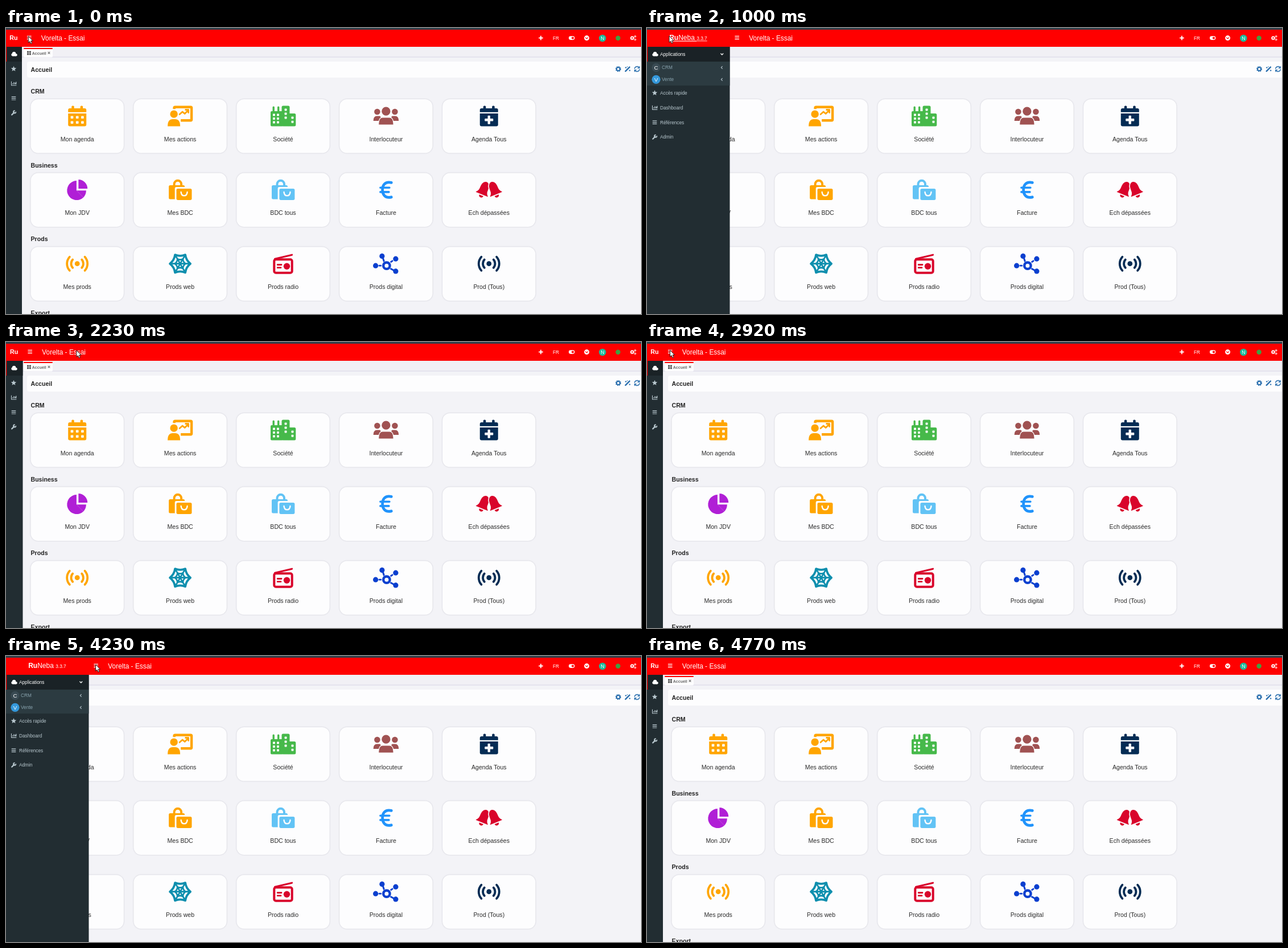
Recreate the animation shown at these times as an HTML page. Size 1116 by 502 pixels, loop 4.85 s.

```html
<!DOCTYPE html>
<html lang="fr">
<head>
<meta charset="utf-8">
<title>Accueil</title>
<style>
html, body { margin: 0; width: 100%; height: 100%; overflow: hidden; background: #f3f3f7; }
svg { display: block; width: 1116px; height: 502px; font-family: "Liberation Sans", Arial, sans-serif; }
.i { fill: currentColor; }
.l { fill: none; stroke: currentColor; stroke-linecap: round; stroke-linejoin: round; }
.h { fill: #fdfdfe; }
.card { fill: #fdfdfe; filter: drop-shadow(0 .8px 1.2px rgba(40, 40, 70, .22)); }
.b { font-weight: bold; }
.m { text-anchor: middle; }
</style>
</head>
<body>
<svg id="stage" viewBox="0 0 1116 502"></svg>
<script>
const LOOP = 4850, FRAME = 1000 / 13, SLIDE = 300;
const MINI = 28, WIDE = 145.5;

// Markup helpers
const text = (x, y, s, size, fill, cls = '') =>
  `<text x="${x}" y="${y}" font-size="${size}" fill="${fill}" class="${cls}">${s}</text>`;
const rect = (x, y, w, h, r = 0, extra = 'class="i"') =>
  `<rect x="${x}" y="${y}" width="${w}" height="${h}" rx="${r}" ${extra}/>`;
const dot = (x, y, r, extra = 'class="i"') => `<circle cx="${x}" cy="${y}" r="${r}" ${extra}/>`;
const line = (d, w, extra = '') => `<path class="l" d="${d}" stroke-width="${w}" ${extra}/>`;
const area = (d, extra = 'class="i"') => `<path d="${d}" ${extra}/>`;
const at = (x, y, color, body, more = '') =>
  `<g transform="translate(${x} ${y}) ${more}" color="${color}">${body}</g>`;
const hole = 'class="h"';
const polar = (r, deg) => {
  const a = deg * Math.PI / 180;
  return (r * Math.cos(a)).toFixed(2) + ' ' + (r * Math.sin(a)).toFixed(2);
};

// Small interface icons
const cloud = dot(-2.8, 1, 2.4) + dot(-.4, -1, 3.2) + dot(3, 1.2, 2.2) + rect(-3, .5, 6.2, 2.9, 1);
const star = area('M' + [...Array(10)].map((_, k) => polar(k % 2 ? 2.2 : 5, k * 36 - 90)).join('L') + 'Z');
const chart = line('M-4-3.5V3.3H4.5', 1.1) + line('M-1.7 1.3V-.5M.5 1.3V-2.5M2.7 1.3V-1.5M4.2 1.3V-3', 1.3, 'style="stroke-linecap:butt"');
const bars = w => line(`M${-w}-2.7H${w}M${-w} 0H${w}M${-w} 2.7H${w}`, 1.2, 'style="stroke-linecap:butt"');
const wrench = line('M-3.3 3.3L1 -1', 2.2) + line('M1.6-3.9A2.2 2.2 0 1 0 3.9-1.6', 1.7);
const gear = (r, w) => dot(0, 0, r, `class="l" stroke-width="${w}"`) +
  dot(0, 0, r * 1.38, `class="l" style="stroke-linecap:butt" stroke-width="${w * .9}" stroke-dasharray="${r * 1.38 * Math.PI / 8}"`);
const chevDown = line('M-2-1L0 1L2-1', 1.3);
const chevLeft = line('M1-2L-1 0L1 2', 1.1);

// Card icons, centred on 0,0
const calendar = inner => rect(-10, -18, 4.6, 8, 2) + rect(5.4, -18, 4.6, 8, 2) +
  area('M-16-6.8V-10.5Q-16-13.5-13-13.5H13Q16-13.5 16-10.5V-6.8Z') +
  area('M-16-4.5H16V15Q16 18 13 18H-13Q-16 18-16 15Z') + inner;
const days = calendar([0, 9].map(y => [-11.5, -2.3, 6.9].map(x => rect(x, y, 4.6, 4.6, .8, hole)).join('')).join(''));
const dayPlus = calendar(rect(-7.5, 4.6, 15, 4.4, 1, hole) + rect(-2.2, -.7, 4.4, 15, 1, hole));
const board = rect(-10.5, -15.7, 30.5, 23.5, 1.5, 'class="l" stroke-width="4.4"') +
  dot(-11, -3.4, 9, hole) + rect(-24, 2.5, 25, 17, 0, hole) + dot(-11, -3.4, 6.7) +
  area('M-22 18Q-22 5.6-13 5.6H-9Q0 5.6 0 18Z') +
  line('M-1-3L4-7.5L8-4L14.5-10.5M9.5-11H14.5V-6', 2.8);
const city = rect(-22, -8.5, 22, 26.5, 2) + rect(-18.5, -17, 3.4, 10, 1.6) + rect(-10, -17, 3.4, 10, 1.6) +
  rect(-2.5, -18, 14, 36, 2.5) + rect(8, -4.5, 14.3, 22.5, 2.5) +
  [[-18, -4], [-11, -4], [-18, 2.4], [-11, 2.4], [-18, 9], [-11, 9], [2.6, -13], [2.6, -6], [2.6, 1], [14.5, 1], [14.5, 8.3]]
    .map(([x, y]) => rect(x, y, 3.9, 4, .8, hole)).join('');
const side = s => dot(15.5 * s, -7.5, 5.3) + area(`M${22.3 * s} 8.5Q${22.3 * s} 0 ${16 * s} 0H${11 * s}Q${7 * s} 2 ${11.5 * s} 8.5Z`);
const users = side(-1) + side(1) + dot(0, -8.3, 9, hole) + dot(0, -8.3, 7.6) +
  area('M-13.2 15.5Q-13.2 2.4-6 2.4H6Q13.2 2.4 13.2 15.5Z', 'class="i" stroke="#fdfdfe" stroke-width="1.2"');
const pie = area('M-1.3-16V1.2L10.8 13.3A17 17 0 1 1-1.3-16Z') +
  area('M-1.3 1.2H15.6A17 17 0 0 1 10.8 13.3Z') + area('M2.2-18A16 16 0 0 1 18-2.2H2.2Z');
const bags = line('M-10.5-7V-10A6.2 6.2 0 0 1 2-10V-7', 4) + rect(-20, -8, 28, 24.5, 2.5) +
  rect(-9.4, -5, 32, 24, 3, hole) + rect(-6.6, -2.2, 27, 20, 2.6) +
  area('M1.5 3.8Q2 10.3 7 10.3Q12 10.3 12.5 3.8', 'fill="none" stroke="#fdfdfe" stroke-width="2.4" stroke-linecap="round"');
const euro = line('M9.3-12.7C-1-15-6.3-9-6.3 0C-6.3 9-1 15 9.3 12.7', 4.8) + line('M-10-3.8H6M-10 3.8H5', 3.6);
const bell = area('M-12 10C-7 6-8.5 2-8-3C-7.5-9-4-13 0-13S7.5-9 8-3C8.5 2 7 6 12 10Q12.5 12 10 12H-10Q-12.5 12-12 10Z',
  'class="i" stroke="#fdfdfe" stroke-width="1.6"') + area('M-4 13.2H4Q3.4 17 0 17T-4 13.2Z');
const bells = at(-8.5, -2.5, 'currentColor', bell, 'rotate(22)') + at(8.5, -2.5, 'currentColor', bell, 'rotate(-22)');
const arcs = r => [0, 180].map(a => line(`M${polar(r, a - 42)}A${r} ${r} 0 0 1 ${polar(r, a + 42)}`, 3.8)).join('');
const tower = dot(0, 0, 4.4) + arcs(10.7) + arcs(18);
const ring = (r, dip) => 'M' + polar(r, 0) + [1, 2, 3, 4, 5, 6].map(k => `Q${polar(r * dip, k * 60 - 30)} ${polar(r, k * 60)}`).join('') + 'Z';
const web = line(ring(18, .66), 3.8) + line(ring(9.5, .62), 2.8) +
  line([0, 60, 120].map(a => `M${polar(18, a)}L${polar(18, a + 180)}`).join(''), 2.7);
const radio = line('M-14.5-8.5L15.5-15.5', 3.2) + rect(-15.7, -7.5, 31.4, 23.5, 3, 'class="l" stroke-width="4"') +
  dot(6.5, 4.5, 5.7) + line('M-9.8 1.8H-3M-9.8 7H-4', 2.8);
const nodes = line('M-6.5-13L-2.5-1M5 7L16 13', 3) + line('M-17 3.5H-6M4.5-.5L16-8', 2.8, 'stroke-dasharray="3 5" stroke-dashoffset="-5"') +
  [[-7, -13.3], [17, -8.5], [17, 13.2], [-18.3, 3.5]].map(([x, y]) => dot(x, y, 4.6)).join('') +
  dot(1, 3.5, 8.4, hole) + dot(1, 3.5, 5.7, 'class="l" stroke-width="4.4"');

const ORANGE = '#ffa500', RED = '#d9042b', NAVY = '#052c54';
const sections = [
  ['CRM', ['Mon agenda', days, ORANGE], ['Mes actions', board, ORANGE], ['Société', city, '#46b94a'],
    ['Interlocuteur', users, '#a05252'], ['Agenda Tous', dayPlus, NAVY]],
  ['Business', ['Mon JDV', pie, '#b01fd6'], ['Mes BDC', bags, ORANGE], ['BDC tous', bags, '#62c3f5'],
    ['Facture', euro, '#2093fb'], ['Ech dépassées', bells, RED]],
  ['Prods', ['Mes prods', tower, ORANGE], ['Prods web', web, '#0e8fae'], ['Prods radio', radio, RED],
    ['Prods digital', nodes, '#0a3fcf'], ['Prod (Tous)', tower, NAVY]],
  ['Export']
];
const INK = '#222', SOFT = '#b8c7ce', DIM = '#8aa4af', BLUE = '#2a6fae';

const grid = sections.map(([name, ...cards], row) => {
  const y = 125 + row * 129.6;
  return text(43.5, y - 9.8, name, 10.6, INK, 'b') + cards.map(([label, icon, color], col) => {
    const x = 43.5 + col * 180.9, mid = x + 81.7;
    return rect(x, y, 163.4, 94.5, 13, 'class="card"') + at(mid, y + 29.5, color, icon) +
      text(mid, y + 73.8, label, 10.6, '#2b2b2b', 'm');
  }).join('');
}).join('');

const page = rect(0, 0, 1116, 502, 0, 'fill="#f3f3f7"') +
  rect(0, 33, 1116, 18, 0, 'fill="#f1f0f5"') + rect(0, 50.5, 1116, 1, 0, 'fill="#d8d5e6"') +
  rect(31, 35, 51, 16.5, 2, 'fill="#fdfdfe"') + rect(31, 35, 51, 2, 1, 'fill="#f00"') +
  [0, 3.8].map(dy => [0, 3.8].map(dx => rect(37 + dx, 40.5 + dy, 3.1, 3, 0, 'fill="#555"')).join('')).join('') +
  text(45.8, 46.5, 'Accueil', 7, '#666', 'b') + at(75.5, 43.7, '#666', line('M-1.5-1.5L1.5 1.5M1.5-1.5L-1.5 1.5', 1.1)) +
  rect(37, 59, 1090, 28, 4, 'fill="#fdfdfe"') + text(43.5, 76.6, 'Accueil', 10.6, INK, 'b') +
  at(1076, 72, BLUE, gear(3, 2)) +
  at(1092.5, 72, BLUE, line('M-3.8 3.8L3.4-3.4', 2.4) + line('M-3.2-3.5V-1.5M-4.2-2.5H-2.2M3.6 1.6V3.6M2.6 2.6H4.6M-.5-4.6V-3.6', 1)) +
  at(1109, 72, BLUE, line('M-4.2-.8A4.3 4.3 0 0 1 3.6-2.5M4.2 .8A4.3 4.3 0 0 1-3.6 2.5', 1.5) + line('M4.3-4.6V-1.6H1.3M-4.3 4.6V1.6H-1.3', 1.2)) +
  grid;

const item = (y, icon, label) => at(13.5, y, SOFT, icon) + text(23, y + 2.9, label, 8.25, SOFT);
const sub = (y, letter, label, color) => dot(16, y, 7.6, `fill="${color}"`) +
  text(16, y + 3.5, letter, 9.8, '#fff', 'm') + text(26, y + 2.9, label, 8.25, DIM);
const menu = [[star, 'Accès rapide'], [chart, 'Dashboard'], [bars(3.8), 'Références'], [wrench, 'Admin']];

const sidebar = rect(0, 33, 146, 469, 0, 'fill="#222d32"') + rect(0, 33, 146, 26, 0, 'fill="#1a2226"') +
  rect(0, 33, 1.2, 26, 0, 'fill="#f00"') + at(14.5, 46, '#fff', cloud) +
  `<g id="mini">${menu.map(([icon], k) => at(13.5, 71.7 + k * 25.8, SOFT, icon)).join('')}</g>` +
  `<g id="full">${rect(0, 59, 146, 42, 0, 'fill="#2c3b41"')}${text(23, 48.9, 'Applications', 8.25, '#fff')}` +
  sub(69.3, 'C', 'CRM', '#394a53') + sub(90.3, 'V', 'Vente', '#3498db') +
  menu.map(([icon, label], k) => item(114 + k * 25.8, icon, label)).join('') +
  `<g id="chevs">${at(-13.7, 46, '#fff', chevDown)}${at(-14.2, 69.3, SOFT, chevLeft)}${at(-14.2, 90.3, SOFT, chevLeft)}</g></g>`;

const header = rect(0, 0, 1116, 3.5, 0, 'fill="#333e48"') + rect(0, 3, 1116, 30, 0, 'fill="#f00"') +
  text(0, 21.2, 'Ru', 10.6, '#fff', 'b m" id="short') +
  `<text id="logo" y="21.4" font-size="12" fill="#fff" class="m"><tspan class="b">Ru</tspan>Neba <tspan font-size="8.3">3.3.7</tspan></text>` +
  `<g id="nav">${at(12.7, 17, '#fff', bars(3.8))}${text(33.8, 21.5, 'Vorelta - Essai', 11.9, '#fff')}</g>` +
  at(940, 17.5, '#fff', line('M-3 0H3M0-3V3', 1.9)) + text(966.5, 20.6, 'FR', 8.2, '#fff', 'm') +
  rect(989, 14.3, 10.4, 6.6, 3.3, 'fill="#fff"') + dot(996, 17.6, 2.1, 'fill="#f00"') +
  dot(1020.6, 17.6, 4.5, 'fill="#fff"') + at(1020.6, 17.9, '#f00', chevDown) +
  dot(1048.3, 18, 6.2, 'fill="#1abc9c"') + text(1048.3, 21.2, 'N', 8.6, '#fff', 'm') +
  dot(1075.6, 17.8, 4.2, 'fill="#3fa142"') +
  at(1100.5, 17.6, '#fff', gear(2.1, 1.7)) + at(1105.6, 14.8, '#fff', gear(1.1, 1)) + at(1105.6, 20.4, '#fff', gear(1.1, 1));

const $ = id => document.getElementById(id);
$('stage').innerHTML = `<clipPath id="clip"><rect id="cut" y="33" height="469"/></clipPath>` + page +
  `<g clip-path="url(#clip)">${sidebar}</g>` + header +
  `<path id="cursor" d="M0 0V11.3L2.6 9L4.4 13.1L6.4 12.2L4.6 8.2H8Z" fill="#fff" stroke="#111" stroke-width=".9"/>`;

// Motion: [time, open] toggles and [time, x, y] pointer stops
const toggles = [[630, 1], [1955, 0], [3120, 1], [4390, 0]];
const pointer = [[0, 39.3, 14.5], [1130, 39, 14], [1600, 157.5, 15], [2025, 157.5, 15], [2580, 40.5, 14.5],
  [3120, 40.5, 14.5], [3380, 38.6, 13.2], [3600, 38.6, 13.2], [4080, 157.5, 15], [4560, 157.5, 15], [4740, 168, -18]];

// cubic-bezier(.42, 0, .58, 1)
function ease(u) {
  let lo = 0, hi = 1, s = .5;
  for (let k = 0; k < 16; k++) {
    s = (lo + hi) / 2;
    const x = 1.26 * s * (1 - s) ** 2 + 1.74 * s * s * (1 - s) + s ** 3;
    if (x < u) lo = s; else hi = s;
  }
  return s * s * (3 - 2 * s);
}
const progress = (t, from, span) => {
  const u = (t - from) / span;
  return u <= 0 ? 0 : u >= 1 ? 1 : ease(u);
};

function draw(t) {
  let open = 0, part = 0;
  for (const [start, state] of toggles) {
    if (t < start) break;
    const p = progress(t, start, SLIDE);
    open = state;
    part = state ? p : 1 - p;
  }
  const w = MINI + (WIDE - MINI) * part;

  let [, x, y] = pointer[0];
  for (let k = 1; k < pointer.length; k++) {
    const [t0, x0, y0] = pointer[k - 1], [t1, x1, y1] = pointer[k];
    if (t < t0) break;
    const p = progress(t, t0, t1 - t0);
    x = x0 + (x1 - x0) * p;
    y = y0 + (y1 - y0) * p;
  }

  $('cut').setAttribute('width', w);
  $('short').setAttribute('x', w / 2 - .6);
  $('logo').setAttribute('x', w / 2 - .3);
  $('logo').setAttribute('text-decoration', x < w ? 'underline' : 'none');
  $('nav').setAttribute('transform', `translate(${w} 0)`);
  $('chevs').setAttribute('transform', `translate(${w} 0)`);
  $('cursor').setAttribute('transform', `translate(${x} ${y})`);
  for (const id of ['full', 'logo']) $(id).style.display = open ? '' : 'none';
  for (const id of ['mini', 'short']) $(id).style.display = open ? 'none' : '';
}

let begin;
function tick(now) {
  begin ??= now;
  const t = (now - begin) % LOOP;
  draw(Math.min(62, Math.floor((t + 5) / FRAME)) * FRAME);
  requestAnimationFrame(tick);
}
draw(0);
requestAnimationFrame(tick);
</script>
</body>
</html>
```
